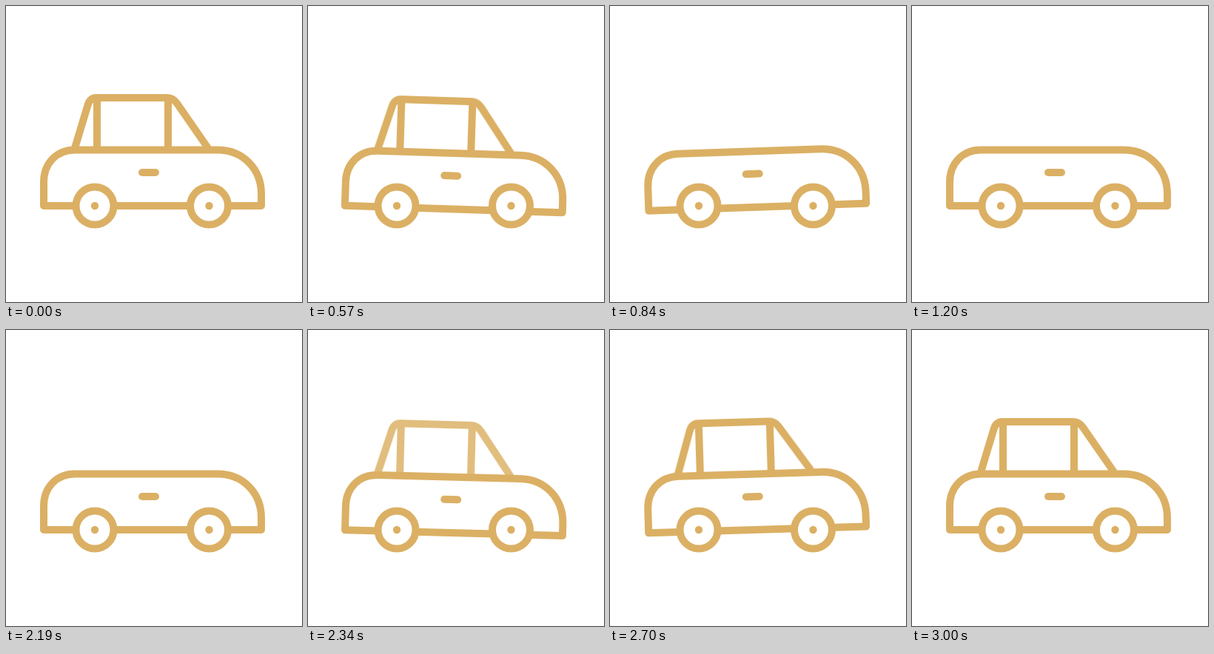
An HTML page without scripts that plays this animation: 400x400 px, repeating every 6090 ms.

```html
<!DOCTYPE html>
<html lang="en">
<head>
<meta charset="utf-8">
<title>Rocking car</title>
<style>
  html, body { margin: 0; width: 100%; height: 100%; overflow: hidden; background: #fff; }
  svg { display: block; width: 100%; height: 100%; }

  .line { fill: none; stroke: #dbb064; stroke-width: 10; stroke-linejoin: round; }
  .round { stroke-linecap: round; }
  .tyre { fill: #fff; }
  .hub { fill: #dbb064; stroke: none; }

  .shell {
    transform-origin: 198px 232px;
    animation: bounce 6090ms infinite, tilt 6090ms infinite;
    animation-timing-function: cubic-bezier(.37, 0, .63, 1);
  }
  .cabin { animation: fade 6090ms linear infinite; }

  /* The car rocks twice: once losing the cabin, once regaining it. */
  @keyframes bounce {
    0%, 4.433%, 19.704%, 35.961%, 49.261%, 100% { translate: 0 0; }
    9.36%, 38.916%   { translate: 0 4.5px; }
    11.166%, 40.722% { translate: 0 -2px; }
    13.629%, 43.186% { translate: 0 1.8px; }
    15.599%, 45.156% { translate: 0 -1px; }
    17.57%, 47.126%  { translate: 0 .5px; }
  }
  @keyframes tilt {
    0%, 4.433%, 19.704%, 35.961%, 49.261%, 100% { rotate: 0deg; }
    9.852%, 39.409%  { rotate: 1.85deg; }
    14.122%, 43.678% { rotate: -2deg; }
    17.241%, 46.798% { rotate: .7deg; }
  }
  @keyframes fade {
    0%, 10.345%, 38.916%, 100% { opacity: 1; }
    13.3%, 35.961% { opacity: 0; }
  }
</style>
</head>
<body>
<svg viewBox="0 0 400 400">
  <defs>
    <g id="wheel">
      <circle class="line tyre" r="25.5"/>
      <circle class="hub" r="5.2"/>
    </g>
  </defs>
  <g class="shell line">
    <g class="cabin">
      <path d="M93 192L110.500 134Q113.500 124 122 124H217Q226 124 231 131.500L273 192"/>
      <path d="M123 124V194M219 124V194"/>
    </g>
    <path d="M51 270V238C51 213 68 194.500 93 194.500H286C320 194.500 345 220 345 254V270Z"/>
    <path class="round" d="M184 225H202"/>
  </g>
  <use href="#wheel" x="120" y="270"/>
  <use href="#wheel" x="274.500" y="270"/>
</svg>
</body>
</html>
```
